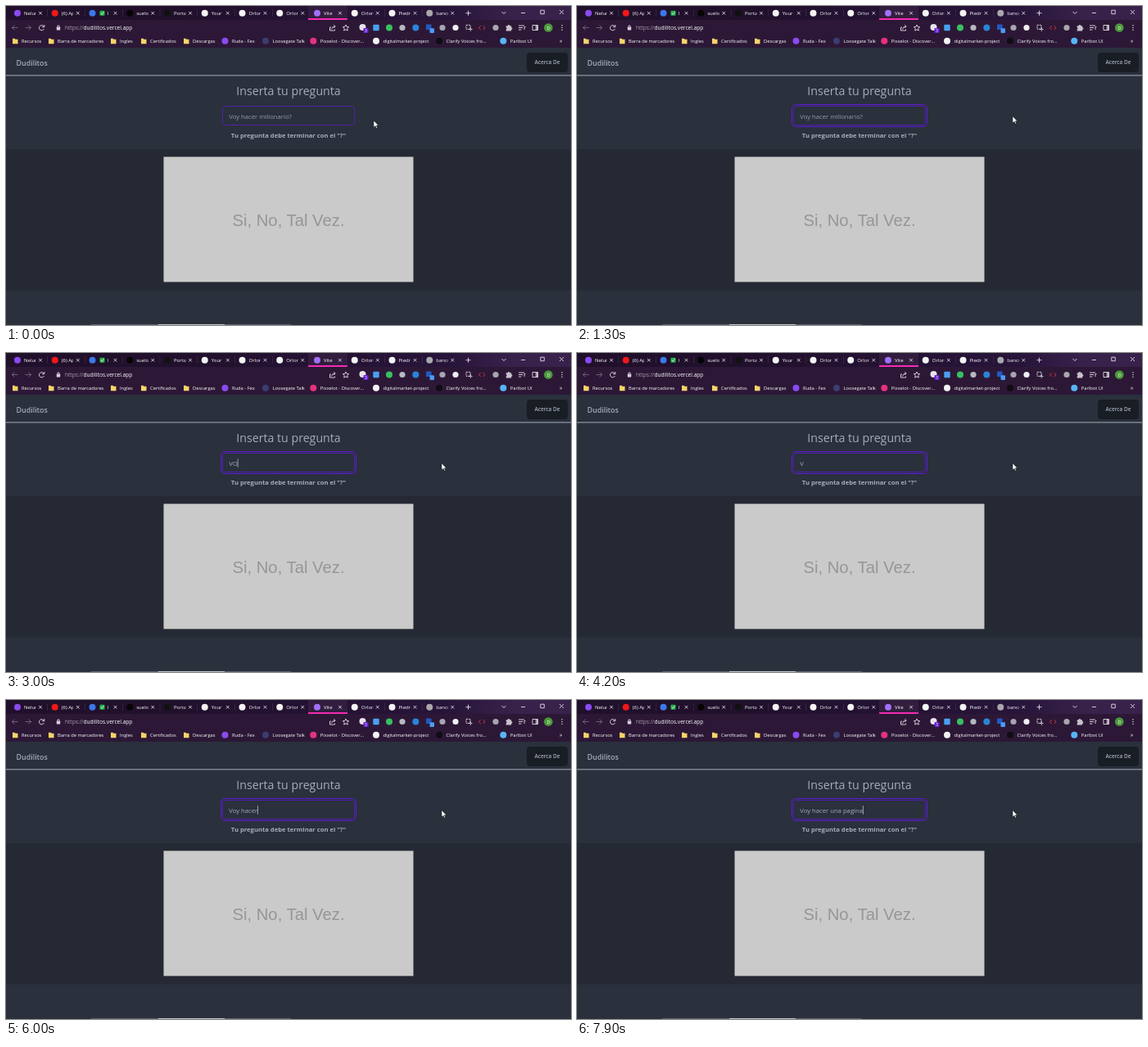
Recreate the animation shown at these times as an HTML page. Size 690 by 390 pixels, loop 8000 ms.

```html
<!DOCTYPE html>
<html lang="es">
<head>
<meta charset="utf-8">
<title>Dudilitos</title>
<style>
  html, body { margin: 0; width: 100%; height: 100%; overflow: hidden; background: #2a303c; }
  svg { display: block; width: 100%; height: 100%; }
  text { font-family: "Open Sans", "Noto Sans", sans-serif; white-space: pre; }
  .line { fill: none; stroke: #e2dde6; stroke-width: .9; }
</style>
</head>
<body>
<svg id="stage" viewBox="0 0 690 390">
  <linearGradient id="strip">
    <stop offset=".3" stop-color="#21102c"/>
    <stop offset=".78" stop-color="#27143a"/>
    <stop offset=".9" stop-color="#38224c"/>
  </linearGradient>
  <g id="browser"></g>
  <g id="page">
    <rect y="51" width="690" height="339" fill="#2a303c"/>
    <rect y="175" width="690" height="172.5" fill="#242933"/>
    <rect y="84.4" width="690" height="1" fill="#a6adbb"/>
    <rect x="636" y="57" width="50" height="24" rx="4" fill="#191d24"/>
    <g fill="#a6adbb">
      <text x="12.5" y="72.6" font-size="8.9" font-weight="600">Dudilitos</text>
      <text x="661" y="71.2" font-size="6.5" font-weight="600" text-anchor="middle">Acerca De</text>
      <text x="345" y="108.8" font-size="14.2" text-anchor="middle">Inserta tu pregunta</text>
      <text x="345" y="161.3" font-size="7.65" font-weight="700" text-anchor="middle">Tu pregunta debe terminar con el "?"</text>
    </g>
    <rect x="264.5" y="122.5" width="161" height="23" rx="3.5" fill="#2a303c" stroke="#4f20ad"/>
    <rect id="ring" x="262.5" y="120.5" width="165" height="27" rx="5" fill="none" stroke="#5d1bd6"/>
    <text id="typed" x="272.3" y="137.5" font-size="7.7" xml:space="preserve"></text>
    <rect id="caret" y="129.2" width=".8" height="10.6" fill="#b4bac6"/>
    <rect x="192.5" y="184.4" width="305" height="153" fill="#cacaca"/>
    <text x="345" y="268.7" font-size="20.3" text-anchor="middle" fill="#969696"
      style="font-family:'Liberation Sans',Arial,sans-serif">Si, No, Tal Vez.</text>
    <path d="M104 389.5H348" stroke="#5c606a"/>
    <path d="M186 389.5H267" stroke="#c2c4c8"/>
  </g>
  <path id="arrow" d="M0 0V8.4L2 6.6 3.3 9.4 4.6 8.8 3.3 6.1H5.9Z" fill="#fff" stroke="#111" stroke-width=".5"/>
  <g id="beam">
    <circle id="click" cx="-1" r="3.6" fill="#a8122c" opacity=".75"/>
    <path d="M-1.4-4H1.4M0-4V4M-1.4 4H1.4" fill="none" stroke="#d8b4bc" stroke-width=".6"/>
  </g>
</svg>
<script>
const LOOP = 8000, STEP = 100;
const $ = id => document.getElementById(id);
const dot = (x, y, color, r = 4) => `<circle cx="${x}" cy="${y}" r="${r}" fill="${color}"/>`;
const box = (x, y, w, h, color, rx = 0) =>
  `<rect x="${x}" y="${y}" width="${w}" height="${h}" rx="${rx}" fill="${color}"/>`;
const line = (d, extra = '') => `<path class="line" d="${d}" ${extra}/>`;
const label = (x, y, text, size = 5.75) =>
  `<text x="${x}" y="${y}" font-size="${size}" fill="#fff">${text}</text>`;

function tabStrip() {
  const tabs = [
    ['#8a4af0', 'Nelura'], ['#f01818', '(6) Ap'], ['#3c78e8', ''], ['#050505', 'suelo'],
    ['#111', 'Porta'], ['#f4f4f4', 'Your'], ['#f4f4f4', 'Orlon'], ['#f4f4f4', 'Orlon'],
    ['#a070f8', 'Vite'], ['#f4f4f4', 'Orlon'], ['#f4f4f4', 'Piedr'], ['#a8a8ac', 'banco']
  ];
  let out = box(0, 0, 690, 17, 'url(#strip)') + box(369, 0, 48, 17, '#321d3e', 2) +
    box(369, 15, 48, 2, '#f32bb0');
  tabs.forEach(([color, name], i) => {
    const x = 14 + i * 45.75;
    out += dot(x, 8.7, color) +
      `<svg x="${x + 8}" y="0" width="14.5" height="16">${label(0, 10.9, name, 6)}</svg>` +
      line(`M${x + 26.2} 6.9l3.6 3.6m0-3.6l-3.6 3.6`);
    if (i === 2) out += box(x + 9, 5.7, 6, 6, '#22b84a', 1) +
      line(`M${x + 10.3} 8.8l1.4 1.5 2.3-3.2`) + label(x + 18, 10.9, 'l', 6);
    if (i < 11 && i !== 7 && i !== 8) out += box(x + 36.5, 4, .5, 9, '#4a3852');
  });
  return out + line('M561.5 8.7h6m-3-3v6M605.5 7l2.5 2.5L610.5 7M629 8.5h5M652.8 5.2h4.5v4.5h-4.5zM676 5l5 5m0-5l-5 5');
}

function toolbar() {
  const badge = (x, text, color) => box(x, 27, 6, 6, color, 1) + label(x + 1.5, 32, text, 5);
  return box(0, 17, 690, 34.5, '#2c1836') +
    line('M14.5 26.5h-7m3-3l-3 3 3 3M23.5 26.5h7m-3-3l3 3-3 3', 'opacity=".4"') +
    line('M46.3 25.2A3.1 3.1 0 1 0 46.4 28M46.8 23v2.7h-2.7') +
    box(61.8, 25.8, 4.4, 3.8, '#d8d2dc', .5) + line('M62.8 26v-1a1.2 1.2 0 0 1 2.4 0v1') +
    label(72, 29, '<tspan fill="#a99cb0">https://</tspan>dudilitos.vercel.app', 6.6) +
    line('M397 26h-1.5v4h6v-1.5M397.5 28.5q.5-3.5 4.5-3.5m-1.8-1.8l2 1.8-2 1.8') +
    line('M415 23l1.1 2.4 2.6.3-2 1.8.6 2.6-2.3-1.3-2.3 1.3.6-2.6-2-1.8 2.6-.3z') +
    dot(435.5, 26, '#e8e4ee') + badge(436.5, '3', '#6420d0') +
    box(448.3, 22.8, 7.4, 7.4, '#4aa0f0', 1) + dot(468, 26.5, '#38c060') +
    dot(484, 26.5, '#b8b8c0', 3.6) + dot(500.3, 26.5, '#2a84d8') +
    box(513, 22.5, 6.5, 6.5, '#2458c0', .5) + box(517.5, 27.3, 5.5, 5.7, '#4a9cf4', 1) +
    dot(533, 26.5, '#a8a4b0', 3.6) + dot(549, 26.5, '#f0eef2', 3.6) +
    line('M562 23.3h5v5h-5zM567.3 26v5m-2.5-2.5h5', 'stroke-dasharray="2 .7"') +
    line('M579.7 24.3l-2.3 2.3 2.3 2.3m3-4.6l2.3 2.3-2.3 2.3', 'style="stroke:#f03a46"') +
    dot(598, 26.5, '#a9a6ae', 3.6) +
    `<path d="M610.7 24.2h2a1.3 1.3 0 0 1 2.6 0h1.8v2a1.3 1.3 0 0 1 0 2.6v1.7h-6.4v-2a1.2 1.2 0 0 0 0-2.3z" fill="#c9c2ce"/>` +
    line('M626 24h7m-7 2.5h5m-5 2.5h3.5m3.5 0v-3.5h1.5') +
    line('M643 23.5h6.5v6H643zM647.2 23.5v6M648.4 23.5v6') +
    dot(662.3, 26.5, '#4c9a3c', 5.3) + label(660.4, 28.6, 'D') +
    [23.7, 26.5, 29.3].map(y => dot(679, y, '#ddd6e0', .75)).join('');
}

function bookmarks() {
  const folders = [[8, 'Recursos'], [52, 'Barra de marcadores'], [128, 'Ingles'],
    [165, 'Certificados'], [217, 'Descargas']];
  const links = [[267.5, '#8a4af0', 'Ruda - Fex'], [317, '#3b3d70', 'Loosegate Talk'],
    [375.3, '#e5327e', 'Pixxelot - Discover...'], [452, '#f4f4f4', 'digitalmarket-project'],
    [529, '#100c14', 'Clarify Voices fro...'], [607.3, '#58b4f4', 'Parlbot UI']];
  return folders.map(([x, name]) =>
      `<path d="M${x} 39.7h2.5l1 1h3v5.6h-6.5z" fill="#f8d468"/>` + label(x + 11, 45, name)).join('') +
    links.map(([x, color, name]) => dot(x, 42.8, color) + label(x + 8.5, 45, name)).join('') +
    label(676, 44.8, '»', 6.5);
}

$('browser').innerHTML = tabStrip() + toolbar() + bookmarks();

// Time, text and, where it differs, the start of the caret's blink cycle.
const edits = [
  [800, ''], [2700, 'V'], [3000, 'VO'], [3100, 'VOY'], [3300, 'VOY ', 3400],
  [4100, 'VO', 3400], [4200, 'V', 3400], [4900, 'Vo'], [5200, 'Voy'], [5300, 'Voy '],
  [5500, 'Voy h'], [5600, 'Voy ha'], [5800, 'Voy hace'], [6000, 'Voy hacer'],
  [6100, 'Voy hacer '], [6300, 'Voy hacer u'], [6400, 'Voy hacer un'],
  [6600, 'Voy hacer una '], [6900, 'Voy hacer una p'], [7000, 'Voy hacer una pa'],
  [7500, 'Voy hacer una pag'], [7700, 'Voy hacer una pagi'],
  [7800, 'Voy hacer una pagin'], [7900, 'Voy hacer una pagina']
];
const mousePath = [
  [0, 449, 140], [400, 444, 140], [500, 420, 139.5], [600, 394, 139],
  [700, 379, 139], [800, 378.5, 139], [900, 381, 138], [1000, 424, 120],
  [1100, 485, 116], [1200, 521, 131], [1300, 532, 134.7]
];

function draw(t) {
  const [start, text, blink = start] = edits.findLast(e => e[0] <= t) || [Infinity, ''];
  const focused = t >= start;
  $('ring').style.display = focused ? '' : 'none';
  $('typed').textContent = text || 'Voy hacer millonario?';
  $('typed').setAttribute('fill', text ? '#a6adbb' : '#969ca9');
  $('caret').setAttribute('x', 272.2 + (text ? $('typed').getComputedTextLength() : 0));
  $('caret').style.display = focused && (t - blink) % 1000 < 500 ? '' : 'none';

  const [, x, y] = mousePath.findLast(p => p[0] <= t);
  const overInput = x < 426 && y > 122;
  for (const [id, shown] of [['arrow', !overInput], ['beam', overInput]]) {
    $(id).setAttribute('transform', `translate(${x} ${y})`);
    $(id).style.display = shown ? '' : 'none';
  }
  $('click').style.display = t === 800 ? '' : 'none';
}

const origin = performance.now();
function tick() {
  const t = (performance.now() - origin) % LOOP;
  draw(Math.floor(t / STEP) * STEP);
  requestAnimationFrame(tick);
}
tick();
</script>
</body>
</html>
```
